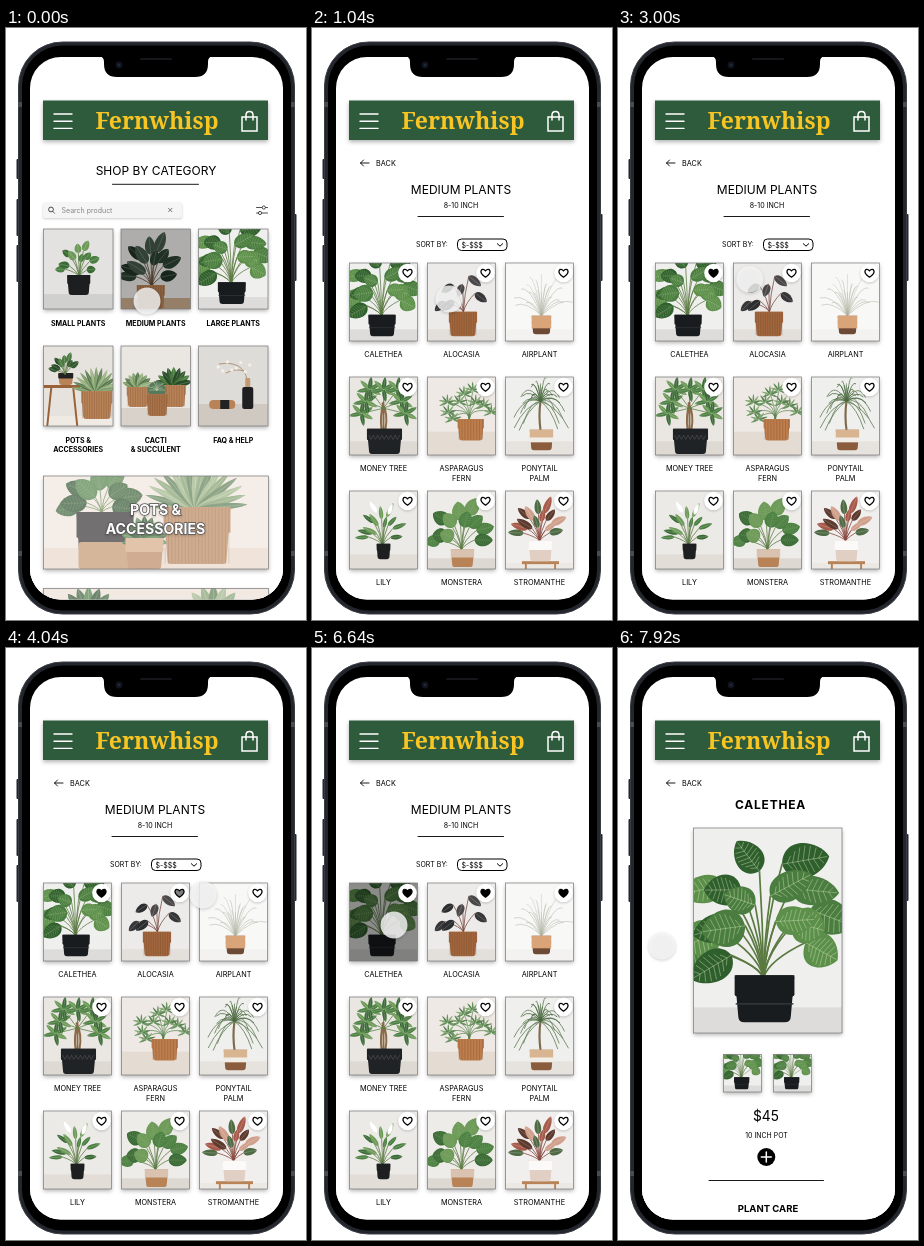
An HTML page for the animation above (8 s loop, 300 by 592 pixels).

```html
<!DOCTYPE html>
<html lang="en">
<head>
<meta charset="utf-8">
<title>Plant shop</title>
<style>
html, body { margin: 0; width: 100%; height: 100%; overflow: hidden; background: #fff; }
#stage { display: block; width: 100vw; height: 100vh; font-family: Inter, Lato, sans-serif; }
.brand { font-family: "Noto Serif", serif; font-weight: 900; }
.lift { filter: drop-shadow(0 2px 2px rgba(0,0,0,.3)); }
.badge { filter: drop-shadow(0 1px 1px rgba(0,0,0,.2)); }
.home, .detail, .shade, .veil, .fill, .cursor { animation: 8s linear infinite; }
.home { animation-name: home; }
.detail { animation-name: detail; opacity: 0; }
.shade { animation-name: shade; opacity: 0; }
.veil { animation-name: veil; opacity: 0; }
.fill { opacity: 0; }
.fill0 { animation-name: fill0; }
.fill1 { animation-name: fill1; }
.fill2 { animation-name: fill2; }
.cursor { animation-name: move; filter: drop-shadow(0 1px 1.5px rgba(0,0,0,.22)); }
@keyframes home { 0%, .5% { opacity: 1; animation-timing-function: ease-out } 7%, 100% { opacity: 0 } }
@keyframes detail { 0%, 89% { opacity: 0; animation-timing-function: ease-out } 95.5%, 100% { opacity: 1 } }
@keyframes shade { 0%, 17.5% { opacity: 0 } 20.5%, 34% { opacity: 1 } 37%, 76.5% { opacity: 0 } 80%, 100% { opacity: 1 } }
@keyframes veil { 0%, 65% { opacity: 0 } 68% { opacity: .45 } 71%, 100% { opacity: 0 } }
@keyframes fill0 { 0%, 28% { opacity: 0 } 31.5%, 100% { opacity: 1 } }
@keyframes fill1 { 0%, 48.5% { opacity: 0 } 52.5%, 100% { opacity: 1 } }
@keyframes fill2 { 0%, 68% { opacity: 0 } 71%, 100% { opacity: 1 } }
@keyframes move {
  0% { transform: translate(141px,273px) }
  13%, 15% { transform: translate(137px,271px); animation-timing-function: ease-in-out }
  21.25% { transform: translate(82px,272px); animation-timing-function: ease-out }
  25%, 32% { transform: translate(91px,246px); animation-timing-function: ease-in-out }
  42.5% { transform: translate(166px,256px); animation-timing-function: ease-out }
  44.5%, 48% { transform: translate(171px,248px) }
  50.5% { transform: translate(197px,247px); animation-timing-function: ease-out }
  58%, 68.5% { transform: translate(250px,247px); animation-timing-function: ease-in }
  75% { transform: translate(148px,262px); animation-timing-function: ease-out }
  79.5%, 86.4% { transform: translate(82px,277px) }
  86.5%, 89% { transform: translate(81px,280px); animation-timing-function: ease-in-out }
  98.5%, 100% { transform: translate(44px,298px) }
}
</style>
</head>
<body>
<svg id="stage" viewBox="0 0 300 592" preserveAspectRatio="none"></svg>
<script>
const repeat = (n, f) => Array.from({ length: n }, (_, i) => f(i)).join('');
const rect = (x, y, w, h, c, r = 0, more = '') =>
  `<rect x="${x}" y="${y}" width="${w}" height="${h}" rx="${r}" fill="${c}" ${more}/>`;
const line = (d, c = '#000', w = 1, more = '') =>
  `<path d="${d}" fill="none" stroke="${c}" stroke-width="${w}" stroke-linecap="round" ${more}/>`;
const disc = (x, y, r, c, more = '') => `<circle cx="${x}" cy="${y}" r="${r}" fill="${c}" ${more}/>`;
const text = (x, y, size, s, more = '') =>
  `<text x="${x}" y="${y}" font-size="${size}" text-anchor="middle" ${more}>${s}</text>`;
const left = 'style="text-anchor:start"';
const bold = 'font-weight="700"';

function random(seed) {
  return () => (seed = (seed * 16807) % 2147483647) / 2147483647;
}

// Plant parts
function leaf(x, y, X, Y, w, c, ribs) {
  const l = Math.hypot(X - x, Y - y), a = Math.atan2(Y - y, X - x) * 180 / Math.PI;
  let veins = `M0 0H${l * .95}`;
  if (ribs) veins += repeat(7, k => {
    const u = l * (k + 1) / 9, v = w * .7 * Math.sin(Math.PI * (k + 1.3) / 8.5);
    return `M${u + l * .09} ${-v}L${u} 0L${u + l * .09} ${v}`;
  });
  return `<g transform="translate(${x} ${y}) rotate(${a})"><path fill="${c}" d="M0 0C${l * .1} ${-w * 1.35} ${l * .8} ${-w} ${l} 0C${l * .8} ${w} ${l * .1} ${w * 1.35} 0 0Z"/>` +
    line(veins, ribs || '#fff', .4, 'opacity=".45"') + '</g>';
}

// Leaves on stems, spread over a half ellipse above the pot
function bush(x, y, { n, rx, ry, len, w, droop = 0, colors, stem = '#5b7a42', ribs, seed = 7 }) {
  const rnd = random(seed * 7919);
  let stems = '', leaves = '';
  for (let i = 0; i < n; i++) {
    const a = Math.PI * (.08 + .84 * (i * .618 % 1)), u = -Math.cos(a), v = -Math.sin(a);
    const k = 1 - .6 * (i / n) + .1 * rnd(), bx = x + u * rx * k, by = y + v * ry * k;
    const l = len * (.8 + .4 * rnd()) / Math.hypot(u, v + droop);
    stems += line(`M${x} ${y}Q${x + u * 3} ${(y + by) / 2} ${bx} ${by}`, stem, .8);
    leaves += leaf(bx, by, bx + u * l, by + (v + droop) * l, w * (.8 + .3 * rnd()), colors[i % colors.length], ribs);
  }
  return stems + leaves;
}

const fan = (n, a0, a1, f) => repeat(n, i => {
  const a = (a0 + (a1 - a0) * i / (n - 1)) * Math.PI / 180;
  return f(Math.cos(a), Math.sin(a), i);
});
const blades = (x, y, n, a0, a1, len, droop, w, c) => fan(n, a0, a1, (u, v, i) => {
  const l = len * (.8 + .2 * Math.sin(i * 2.4));
  return line(`M${x} ${y}Q${x + u * l * .6} ${y + v * l} ${x + u * l} ${y + v * l + droop * Math.abs(u)}`, c, w);
});
const spikes = (x, y, n, a0, a1, len, w, colors) => fan(n, a0, a1, (u, v, i) =>
  leaf(x, y, x + u * len, y + v * len, w, colors[i % colors.length]));

function pot(x, y, w, h, c, ribs = 0, top = c) {
  const t = w * .06;
  return `<path fill="${c}" d="M${x} ${y}h${w}l${-t} ${h - 3}q0 3 -3 3h${6 - w + 2 * t}q-3 0 -3 -3z"/>` +
    rect(x, y, w, h * .45, top, 1) +
    repeat(ribs, i => line(`M${x + w * (i + .5) / ribs} ${y + 1}v${h - 2}`, '#5a3418', .5, 'opacity=".45"'));
}
const room = (wall, floor, y) => rect(0, 0, 225, 120, wall) + rect(0, y, 225, 100, floor);
const deep = ['#33592f', '#4b7a40', '#274a27'];
const fresh = ['#4c7f42', '#6d9a58', '#3a6a35'];
const agave = ['#7d9b68', '#58794e', '#98b080'];
const wood = '#b98358';

const art = {
  calathea: room('#efefee', '#dddcda', 84) +
    bush(33, 70, { n: 16, rx: 29, ry: 57, len: 19, w: 9, droop: .9, colors: ['#4a7d3f', '#2f5f2c', '#5c8f4a'], ribs: '#d5e8ba', seed: 3 }) +
    pot(19.5, 69, 28, 22, '#191c1e') + rect(20, 82, 27, .7, '#33383a'),
  small: room('#e3e2e0', '#d0d0cf', 65) +
    bush(36, 47, { n: 10, rx: 14, ry: 27, len: 10, w: 4, droop: .3, colors: fresh }) + pot(24, 46, 23, 20, '#1d1e20'),
  rubber: room('#e8e7e4', '#c8a98c', 69) +
    bush(31, 57, { n: 11, rx: 15, ry: 36, len: 19, w: 6, droop: .2, colors: ['#2c4030', '#435646', '#1f3124'], stem: '#5b4630' }) +
    pot(16, 56, 28, 24, wood, 11),
  pots: room('#e6e2dd', '#efeae4', 70) + rect(0, 39, 37, 3, '#9a6238') +
    line('M8 42L4 80M30 42L34 80', '#9a6238', 2) + pot(15, 27, 15, 12, wood, 0, '#222') +
    bush(22, 28, { n: 8, rx: 8, ry: 13, len: 9, w: 3, colors: deep }) +
    spikes(53, 46, 13, -170, -10, 25, 2.3, agave) + pot(38, 45, 31, 28, wood, 13),
  cacti: room('#eae7e3', '#d8d2cb', 62) +
    spikes(17, 42, 9, -160, -20, 16, 3, agave) + pot(6, 41, 22, 20, wood, 9) +
    spikes(53, 40, 9, -165, -15, 19, 3.5, deep) + pot(42, 39, 23, 22, wood, 9) +
    disc(36, 44, 9, '#57785a') + blades(36, 44, 9, -180, 0, 9, 0, .6, '#b7cfa8') + pot(26, 48, 21, 22, '#a9744a', 9),
  faq: room('#dedcd8', '#cfc9c2', 58) + line('M49 34Q45 14 21 18M46 25Q36 22 28 27', '#a48263', .8) +
    repeat(8, i => disc(20 + i * 4.5, 21 + 5 * Math.sin(i * 2.3), 1.7, '#f6efe4')) +
    rect(47, 32, 5, 10, '#c39a70', 1) + rect(44, 41, 11, 22, '#1f1f21', 2) +
    rect(11, 54, 26, 9, wood, 4) + rect(22, 54, 9, 9, '#222'),
  alocasia: room('#ecebe9', '#e3dfda', 68) +
    bush(37, 50, { n: 6, rx: 19, ry: 41, len: 14, w: 4.5, droop: 1.2, colors: ['#37373a', '#4b484a', '#2b2d2f'], stem: '#7a4a42' }) +
    pot(22, 50, 29, 25, '#a2673e', 12),
  airplant: room('#f8f8f7', '#f3f2f0', 68) + blades(37, 54, 15, -150, -30, 38, 5, .45, '#a3a994') +
    blades(37, 54, 7, -115, -65, 44, 0, .4, '#b4b9a6') + pot(27, 54, 20, 19, '#6d4a35', 0, '#d9a478') + rect(27, 60, 20, 7, '#d9a478'),
  money: room('#eae7e3', '#ded9d3', 66) + line('M33 54Q31 40 35 27M37 54Q40 38 34 27M35 53V26', '#8a6a48', 2) +
    fan(7, -200, 20, (u, v, i) => {
      const r = i % 2 ? 19 : 24, x = 35 + u * r, y = 30 + v * r * .9;
      return line(`M35 32L${x} ${y}`, '#5c7f43', .8) + spikes(x, y, 6, -190, 80, 13, 2.4, fresh);
    }) + pot(18, 53, 36, 26, '#202326') + repeat(7, i => line(`M${20 + i * 4.5} 60l2.2 4l2.2 -4`, '#555', .6)),
  fern: room('#eee9e4', '#e4dbd3', 56) +
    fan(9, -190, -10, (u, v, i) => {
      const l = 20 + i % 3 * 5, x = 41 + u * l, y = 36 + v * l * .9 + 5 * Math.abs(u);
      return line(`M43 44Q43 30 ${x} ${y}`, '#54804a', .7) + spikes(x - u * 5, y - v * 3, 7, -200, 20, 9, .9, fresh);
    }) + pot(31, 43, 27, 22, '#bd7d4c', 9),
  palm: room('#efefed', '#e6e2dd', 66) + line('M36 54Q34 40 36 25', '#7d6a4d', 2.2) +
    blades(36, 25, 21, -200, 20, 29, 23, .9, '#6c8560') + blades(36, 25, 10, -160, -20, 24, 9, .8, '#48683f') +
    pot(25, 54, 24, 21, '#8b5b3d', 0, '#d9b491') + rect(25, 62, 24, 5, '#f0ece6'),
  lily: room('#eceae6', '#e2ddd6', 65) +
    bush(34, 55, { n: 11, rx: 14, ry: 30, len: 14, w: 2.6, droop: .3, colors: fresh }) +
    leaf(28, 22, 21, 11, 2.5, '#fff') + leaf(40, 24, 44, 13, 2.5, '#fff') + pot(28, 54, 14, 16, '#1e1f20'),
  monstera: room('#eeece9', '#ddd8d2', 69) +
    bush(35, 60, { n: 11, rx: 22, ry: 38, len: 17, w: 8, droop: .4, colors: fresh, ribs: '#9cbd86', seed: 5 }) +
    pot(24, 60, 24, 18, wood, 0, '#d9c3b0'),
  stromanthe: room('#f0efed', '#ece8e4', 74) + rect(17, 72, 38, 3, wood) + line('M21 75V80M51 75V80', wood, 2) +
    bush(35, 51, { n: 13, rx: 16, ry: 30, len: 16, w: 4, droop: .2, colors: ['#4f6b45', '#a65a4a', '#5c3a2e', '#d0a08c'], stem: '#86483f' }) +
    pot(24, 51, 24, 21, '#e2cfc4', 0, '#fbfaf8'),
  banner: room('#efe4db', '#e6d5c8', 72) +
    bush(58, 36, { n: 9, rx: 22, ry: 26, len: 24, w: 10, droop: .5, colors: deep, ribs: '#a3c692' }) +
    pot(33, 36, 57, 57, '#2c2a2a') + rect(35, 66, 53, 27, '#c2926a', 3) +
    spikes(152, 33, 17, -175, -5, 52, 4, agave) + pot(120, 31, 67, 57, wood, 20) +
    spikes(101, 63, 11, -190, 10, 23, 5, deep) + pot(82, 62, 38, 31, '#b9855c', 0, '#d2a680'),
  strip: room('#e9ded4', '#d9c5b3', 60) + spikes(45, 30, 9, -170, -10, 32, 6, deep) + spikes(170, 30, 9, -170, -10, 34, 6, agave)
};

const size = name => name == 'calathea' ? '70 96' : /banner|strip/.test(name) ? '225 93' : '70 80';
const photo = (x, y, w, h, name, shade = '') =>
  `<g class="lift">${rect(x, y, w, h, '#eee')}</g>` +
  `<svg x="${x}" y="${y}" width="${w}" height="${h}" viewBox="0 0 ${size(name)}" preserveAspectRatio="xMidYMax slice">${art[name]}</svg>` +
  shade + rect(x, y, w, h, 'none', 0, 'stroke="#777" stroke-width=".7"');
const labels = (x, y, size, s, more) => s.split('|').map((row, i) => text(x, y + i * 9.5, size, row, more)).join('');
const paper = rect(22, 113, 257, 460, '#fff');
const back = line('M57 135H48.5M51.5 132L48.5 135L51.5 138', '#000', .9) + text(64, 137.6, 7.3, 'BACK', left);

const header = `<g class="lift">${rect(37, 72.5, 225, 39.5, '#2f5b3d')}</g>` +
  repeat(3, i => line(`M48 ${86 + i * 7.2}h18`, '#fff', 1.4)) +
  text(151, 101, 23, 'Fernwhisp', 'class="brand" fill="#f8c523"') +
  line('M236 89H251V103H236ZM240 92V87Q240 83.5 243.5 83.5T247 87V92', '#fff', 1.5);

function home() {
  const names = ['small', 'rubber', 'calathea', 'pots', 'cacti', 'faq'];
  const titles = ['SMALL PLANTS', 'MEDIUM PLANTS', 'LARGE PLANTS', 'POTS &amp;|ACCESSORIES', 'CACTI|&amp; SUCCULENT', 'FAQ &amp; HELP'];
  const ring = 'stroke="#222" stroke-width=".8"';
  const cards = names.map((name, i) => {
    const x = 37.5 + i % 3 * 77.5, y = i > 2 ? 318 : 201;
    const dim = i == 1 ? rect(x, y, 69.5, 80, '#000', 0, 'opacity=".25"') : '';
    return photo(x, y, 69.5, 80, name, dim) + labels(x + 34.7, y + 96.5, 7.05, titles[i], bold);
  }).join('');
  const wide = (y, name) => photo(37.5, y, 225, 93, name, rect(37.5, y, 225, 93, '#fff', 0, 'opacity=".33"'));
  const title = 'fill="#fff" stroke="#555" stroke-width="1.4" paint-order="stroke" font-weight="700" class="badge"';
  return paper + text(150, 147, 12, 'SHOP BY CATEGORY') + line('M106.5 156.3H192.5', '#000', .9) +
    `<g class="badge">${rect(37, 174.5, 139, 15.5, '#f5f5f5', 2)}</g>` +
    disc(45, 181.5, 2.4, 'none', ring) + line('M46.8 183.4L48.6 185.3', '#444', .8) +
    text(55.5, 184.6, 7, 'Search product', left + ' fill="#858585"') +
    line('M162.5 180.3l3.5 3.5m0 -3.5l-3.5 3.5', '#444', .7) +
    line('M250.5 179.5h11m-11 5.5h11', '#222', .8) + disc(257.8, 179.5, 1.6, '#fff', ring) + disc(254, 185, 1.6, '#fff', ring) +
    cards + wide(448, 'banner') + labels(149.5, 487, 14.1, 'POTS &amp;', title) +
    text(149.5, 505.5, 14.1, 'ACCESSORIES', title) + wide(560.5, 'strip');
}

function heart(x, y, n) {
  const d = `M${x} ${y + 4.2}c-8.3 -5.7 -3.2 -10.2 0 -6.3c3.2 -3.9 8.3 .6 0 6.3z`;
  return `<g class="badge">${disc(x, y, 9.3, '#fff')}</g>` + line(d, '#000', 1.3, 'stroke-linejoin="round"') +
    (n < 3 ? `<path class="fill fill${n}" d="${d}"/>` : '');
}

function list() {
  const names = ['calathea', 'alocasia', 'airplant', 'money', 'fern', 'palm', 'lily', 'monstera', 'stromanthe'];
  const titles = ['CALETHEA', 'ALOCASIA', 'AIRPLANT', 'MONEY TREE', 'ASPARAGUS|FERN', 'PONYTAIL|PALM', 'LILY', 'MONSTERA', 'STROMANTHE'];
  const cards = names.map((name, i) => {
    const x = 37.5 + i % 3 * 78, y = 235 + Math.floor(i / 3) * 114;
    const dim = i ? '' : rect(x, y, 68, 78, '#000', 0, 'class="shade" fill-opacity=".42"');
    const veil = i == 2 ? rect(x - 1, y - 1, 72, 100, '#fff', 0, 'class="veil"') : '';
    return photo(x, y, 68, 78, name, dim) + heart(x + 58, y + 10, i) + labels(x + 34, y + 94.3, 7.3, titles[i]) + veil;
  }).join('');
  return paper + back + text(149, 165.8, 12, 'MEDIUM PLANTS') + text(149, 180, 7.05, '8-10 INCH') +
    line('M106 188.5H191.5', '#000', .9) + text(104, 219.3, 7, 'SORT BY:', left) +
    rect(145.5, 211, 49.5, 11.5, '#fff', 4, 'stroke="#000"') + text(149.5, 219.5, 7, '$-$$$', left) +
    line('M185.3 215.7l2.7 2.5l2.7 -2.5') + cards;
}

const detail = () => paper + back + text(152.5, 161, 12, 'CALETHEA', bold + ' letter-spacing=".8"') +
  photo(75.5, 180, 148.5, 205, 'calathea') + repeat(2, i => photo(105.5 + i * 50, 406.5, 38, 37.5, 'calathea')) +
  text(148, 473, 13.8, '$45') + text(148.5, 490.3, 6.95, '10 INCH POT') +
  disc(148.3, 509, 9, '#000') + line('M143.3 509h10m-5 -5v10', '#fff', 1.5) +
  line('M91 532.5H205.5', '#000', .9) + text(150, 563.5, 9.5, 'PLANT CARE', bold);

const screen = rect(24, 29, 253, 542.5, '#fff', 31);
const phone = rect(10.5, 131, 4, 20, '#24262c', 1) + repeat(2, i => rect(10.5, 171 + i * 46, 4, 37, '#24262c', 1)) +
  rect(286.5, 186, 4, 67, '#24262c', 1) + rect(12.5, 14, 276, 572, '#24262d', 44, 'stroke="#3a3c44"') +
  repeat(4, i => rect(i % 2 ? 285 : 12, i < 2 ? 74 : 523, 4, 5, '#4a4c53')) +
  rect(16, 17.5, 269, 565, '#000', 41) + screen;
const notch = '<path d="M94 28.5Q98 29 98 34V36Q98 49 111 49H189Q202 49 202 36V34Q202 29 206 28.5Z"/>' +
  disc(113, 37, 3.4, '#11141d') + disc(113, 37, 1.3, '#1f2940') + rect(134, 30, 32, 2, '#15161a', 1);

document.getElementById('stage').innerHTML =
  `<defs><clipPath id="screen">${screen}</clipPath></defs>` + phone +
  `<g clip-path="url(#screen)">${list()}<g class="home">${home()}</g><g class="detail">${detail()}</g>${header}</g>` + notch +
  `<g class="cursor">${disc(0, 0, 13.5, '#f7f7f7', 'fill-opacity=".82"')}</g>`;
</script>
</body>
</html>
```
